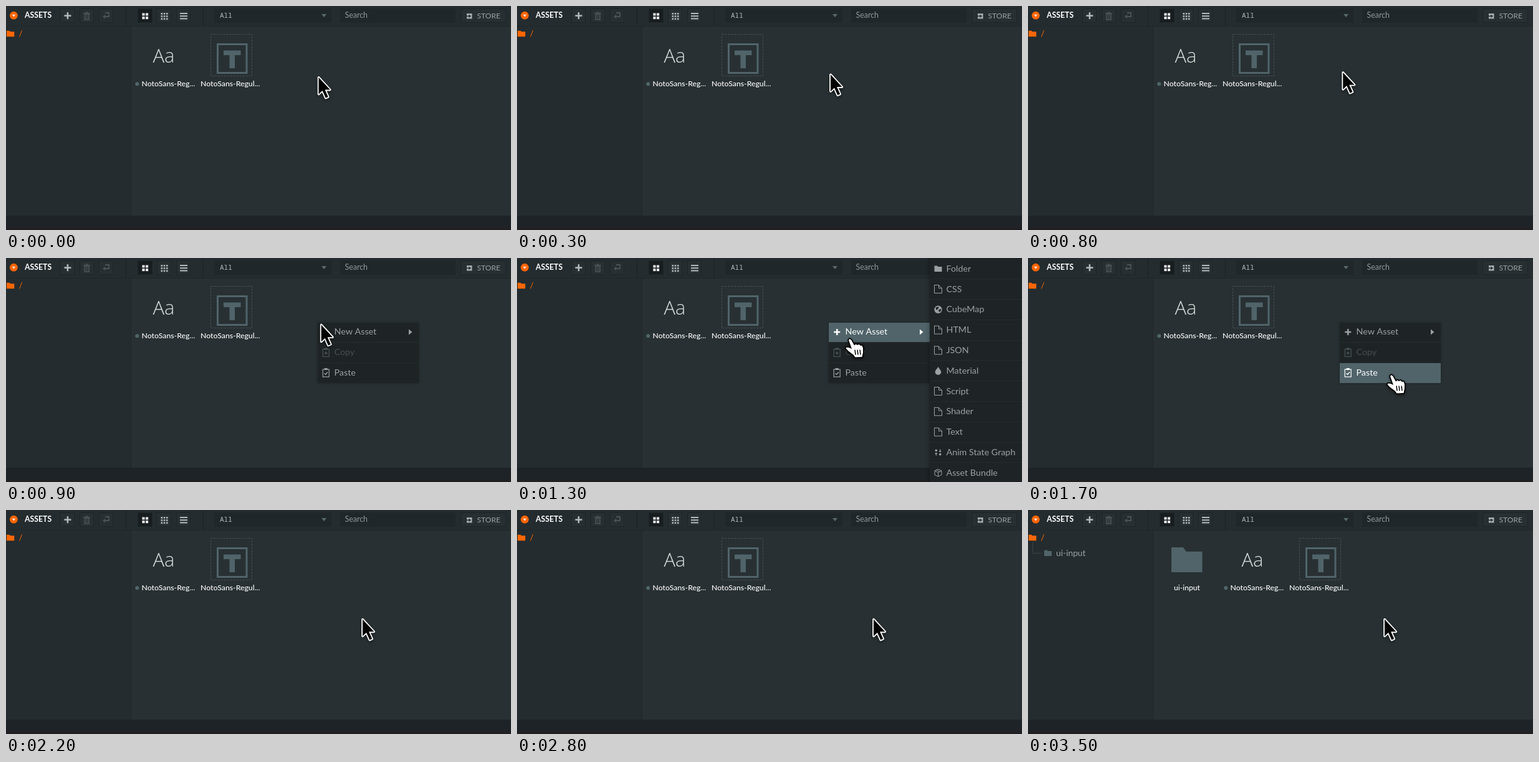
Recreate the animation shown at these times as an HTML page with a canvas. Size 810x360 px, loop 4000 ms.

```html
<!DOCTYPE html>
<html lang="en">
<head>
<meta charset="utf-8">
<title>Assets panel</title>
<style>
html, body { margin: 0; width: 100%; height: 100%; overflow: hidden; background: #283033; }
canvas { display: block; width: 810px; height: 360px; }
</style>
</head>
<body>
<canvas id="stage" width="810" height="360"></canvas>
<script>
const ctx = document.getElementById('stage').getContext('2d');
const LOOP = 4000, STEP = 100;
const MENU_OPEN = 900, HOVER_NEW = 1000, LEAVE_NEW = 1400, HOVER_PASTE = 1600;
const MENU_CLOSE = 2100, FOLDER_ADDED = 3100;
const ORANGE = '#ff6600', GREY = '#9ba1a3', SLATE = '#50646a', DIM = '#4a5356';
const SANS = 'Lato, sans-serif';

// Cursor path: time, x, y
const path = [
  [0, 500.5, 112.8], [600, 503.5, 103.8], [1000, 505, 106],
  [1300, 533.5, 130], [1700, 582.5, 188], [2000, 582.5, 188],
  [2100, 575.5, 180], [2200, 571, 173.8], [LOOP, 571, 173.8]
];

function cursorAt(t) {
  const i = path.findIndex(p => p[0] > t);
  const [t0, x0, y0] = path[i - 1], [t1, x1, y1] = path[i];
  const k = (t - t0) / (t1 - t0);
  return [x0 + (x1 - x0) * k, y0 + (y1 - y0) * k];
}

function rect(x, y, w, h, color) {
  ctx.fillStyle = color;
  ctx.fillRect(x, y, w, h);
}

function frame(x, y, w, h, color, width = 1) {
  ctx.strokeStyle = color;
  ctx.lineWidth = width;
  ctx.strokeRect(x, y, w, h);
}

function text(str, x, y, size, color, weight = 400, family = SANS) {
  ctx.font = `${weight} ${size}px ${family}`;
  ctx.fillStyle = color;
  ctx.fillText(str, x, y);
}

function trace(points) {
  ctx.beginPath();
  points.forEach(([x, y]) => ctx.lineTo(x, y));
}

function poly(points, color) {
  trace(points);
  ctx.closePath();
  ctx.fillStyle = color;
  ctx.fill();
}

function line(points, color, width = 1) {
  trace(points);
  ctx.strokeStyle = color;
  ctx.lineWidth = width;
  ctx.stroke();
}

function dot(x, y, r, color) {
  ctx.beginPath();
  ctx.arc(x, y, r, 0, Math.PI * 2);
  ctx.fillStyle = color;
  ctx.fill();
}

function at(x, y, draw) {
  ctx.save();
  ctx.translate(x, y);
  draw();
  ctx.restore();
}

function folder(x, y, w, h, color) {
  at(x, y, () => poly([
    [0, 0], [w * .38, 0], [w * .48, h * .17], [w, h * .17], [w, h], [0, h]
  ], color));
}

function plus(x, y, r, color) {
  rect(x - r, y - 1.25, r * 2, 2.5, color);
  rect(x - 1.25, y - r, 2.5, r * 2, color);
}

function button(x, w = 23, fill = '#272f32') {
  rect(x, 4, w, 23, fill);
  frame(x + .5, 4.5, w - 1, 22, '#1e2527');
}

function dotGrid(x, y, count, size, gap, color) {
  for (let i = 0; i < count * count; i++)
    rect(x + i % count * gap, y + Math.floor(i / count) * gap, size, size, color);
}

function drawHeader() {
  rect(0, 0, 810, 32, '#242c2f');
  rect(0, 32, 810, 1, '#1f2628');
  rect(192, 0, 1, 32, '#1b2224');
  rect(316, 0, 1, 32, '#1b2224');
  dot(12.4, 15.2, 6.4, ORANGE);
  poly([[9.4, 13.8], [15.4, 13.8], [12.4, 17.4]], '#f5dfd1');
  text('ASSETS', 30, 19.4, 12.3, '#ffffff', 700);

  [87, 118, 149].forEach(x => button(x));
  plus(98.9, 15.6, 5.5, '#b4bbbd');
  rect(124, 11, 11, 1.5, DIM);
  rect(127.5, 9.3, 4, 1.5, DIM);
  frame(126, 13, 7.2, 9, DIM, 1.5);
  line([[128.5, 14], [128.5, 21]], DIM);
  line([[131, 14], [131, 21]], DIM);
  line([[159, 11], [165, 11], [165, 17], [158, 17]], DIM, 1.8);
  poly([[155, 17], [159.2, 13.8], [159.2, 20.2]], DIM);

  button(211, 24, '#181e20');
  button(242);
  button(273);
  dotGrid(218.5, 11.5, 2, 4, 5.6, '#ffffff');
  dotGrid(248.5, 11, 3, 2.7, 4.2, '#aeb5b7');
  for (let i = 0; i < 3; i++) rect(279, 11 + i * 4.2, 12, 2, '#b4bbbd');

  rect(334, 4, 188, 23, '#20272a');
  text('All', 343, 19, 11, '#b1b8ba', 400, '"Noto Sans Mono", monospace');
  poly([[506, 13], [514, 13], [510, 18]], '#596a6e');
  rect(536, 4, 185, 23, '#20272a');
  text('Search', 543.5, 19.3, 12.4, '#8f989a');
  button(729, 73);
  rect(739, 12, 8.5, 8.5, '#a6adaf');
  line([[737.5, 16.3], [744, 16.3]], '#242c2f', 1.5);
  poly([[742.5, 13.6], [746, 16.3], [742.5, 19]], '#242c2f');
  text('STORE', 755.5, 20.2, 12.1, GREY);
}

function drawPanel() {
  rect(0, 0, 810, 360, '#283033');
  rect(0, 33, 200, 304, '#242c2f');
  rect(200, 33, 1, 304, '#20272a');
  drawHeader();
  rect(0, 337, 810, 20, '#1d2326');
  rect(0, 356, 810, 4, '#211f21');
  folder(1, 39.7, 12.3, 9.6, ORANGE);
  text('/', 20.5, 49, 13.5, ORANGE);
}

function drawFonts() {
  text('Aa', 235.5, 90.5, 31, '#d9dddd', 300, '"Open Sans", "Noto Sans", sans-serif');
  dot(210.3, 125.2, 3, '#50666a');
  text('NotoSans-Reg...', 217.5, 129, 12.25, '#ffffff', 500);

  ctx.setLineDash([3, 2]);
  frame(328.5, 45.5, 66, 67, '#455255');
  ctx.setLineDash([]);
  frame(339.5, 61.5, 46.5, 46, SLATE, 3);
  rect(349, 71.5, 27.5, 7.5, SLATE);
  rect(358.5, 79, 8.5, 21, SLATE);
  text('NotoSans-Regul...', 312, 129, 12.25, '#ffffff', 500);
}

function drawNewFolder() {
  line([[7.5, 51], [7.5, 69.5], [22, 69.5]], '#394447');
  folder(26, 64.5, 12, 9.5, SLATE);
  text('ui-input', 45, 74, 13.8, GREY);
  folder(230, 60, 49.5, 40, SLATE);
  text('ui-input', 234, 129, 12.1, '#ffffff', 500);
}

function clipboard(x, y, color, check) {
  at(x, y, () => {
    frame(-5, -5.5, 10, 12, color, 1.2);
    rect(-2.5, -7.5, 5, 3, color);
    if (check) line([[-2.6, .8], [-.7, 2.7], [2.8, -1.2]], color, 1.4);
    else {
      line([[-2.6, .8], [2.6, .8]], color, 1.4);
      line([[0, -1.8], [0, 3.4]], color, 1.4);
    }
  });
}

function drawMenu(active) {
  ctx.save();
  ctx.shadowColor = 'rgba(0,0,0,.3)';
  ctx.shadowBlur = 4;
  rect(500, 104, 162, 97, '#1e2426');
  ctx.restore();
  rect(500, 135, 162, 1, '#252c2e');
  rect(500, 168, 162, 1, '#252c2e');
  if (active === 'new') rect(500, 104, 162, 31, SLATE);
  if (active === 'paste') rect(500, 169, 162, 32, SLATE);
  const newColor = active === 'new' ? '#ffffff' : GREY;
  const pasteColor = active === 'paste' ? '#ffffff' : GREY;
  plus(513.3, 119, 5, newColor);
  text('New Asset', 526.5, 123.3, 14.3, newColor);
  poly([[646, 114.5], [651.5, 119], [646, 123.5]], newColor);
  clipboard(513.2, 152, DIM, false);
  text('Copy', 526.5, 156.3, 14.3, '#454d50');
  clipboard(513.2, 184.5, pasteColor, true);
  text('Paste', 526.5, 189.2, 14.3, pasteColor);
}

const icons = {
  folder: () => folder(-6, -4.7, 12, 9.5, GREY),
  file() {
    line([[-6, -6.5], [1, -6.5], [6, -1.5], [6, 6.5], [-6, 6.5], [-6, -7]], GREY);
    line([[1, -6.5], [1, -1.5], [6, -1.5]], GREY);
  },
  globe() {
    dot(0, 0, 6.2, GREY);
    poly([[-4, -3], [1, -5], [0, -1], [-3, 1]], '#1e2426');
    poly([[1, 0], [5, -1], [4, 3], [1, 4]], '#1e2426');
  },
  drop() {
    ctx.beginPath();
    ctx.moveTo(0, -6.5);
    ctx.bezierCurveTo(2, -2.5, 4.8, -1, 4.8, 2);
    ctx.bezierCurveTo(4.8, 8, -4.8, 8, -4.8, 2);
    ctx.bezierCurveTo(-4.8, -1, -2, -2.5, 0, -6.5);
    ctx.fillStyle = GREY;
    ctx.fill();
  },
  states() {
    for (const s of [-1, 1]) {
      dot(3.2 * s, 3.2 * s, 1.8, GREY);
      line([[3.2 * s, -5 * s], [3.2 * s, -1 * s]], GREY, 1.2);
      poly([[1 * s, -2.5 * s], [5.4 * s, -2.5 * s], [3.2 * s, .2 * s]], GREY);
    }
  },
  box() {
    line([[0, -6], [5.5, -3.2], [5.5, 3.2], [0, 6], [-5.5, 3.2], [-5.5, -3.2], [0, -6]], GREY);
    line([[-5.5, -3.2], [0, -.4], [5.5, -3.2]], GREY);
    line([[0, -.4], [0, 6]], GREY);
    line([[-2.7, -4.6], [2.8, -1.8]], GREY);
  }
};

const assetTypes = [
  ['folder', 'Folder'], ['file', 'CSS'], ['globe', 'CubeMap'], ['file', 'HTML'],
  ['file', 'JSON'], ['drop', 'Material'], ['file', 'Script'], ['file', 'Shader'],
  ['file', 'Text'], ['states', 'Anim State Graph'], ['box', 'Asset Bundle']
];

function drawSubmenu() {
  ctx.save();
  ctx.shadowColor = 'rgba(0,0,0,.4)';
  ctx.shadowBlur = 7;
  rect(662, -10, 160, 380, '#1e2426');
  ctx.restore();
  assetTypes.forEach(([icon, label], i) => {
    const y = 17.2 + i * 32.8;
    rect(662, Math.round(y + 16), 148, 1, '#252c2e');
    at(675.5, y, icons[icon]);
    text(label, 688.5, y + 4.6, 14.3, GREY);
  });
}

function outline(points, fill, stroke) {
  ctx.save();
  ctx.shadowColor = 'rgba(0,0,0,.45)';
  ctx.shadowBlur = 4;
  ctx.shadowOffsetY = 2;
  ctx.lineJoin = 'round';
  trace(points);
  ctx.closePath();
  ctx.strokeStyle = stroke;
  ctx.lineWidth = 3.6;
  ctx.stroke();
  ctx.restore();
  poly(points, fill);
}

function arrow() {
  outline([
    [1, 2], [1, 29], [7, 23.2], [12.3, 35], [16.2, 33.2], [11, 21.8], [19.3, 21.8]
  ], '#000000', '#ffffff');
}

function hand() {
  outline([
    [-1.5, 2], [0, 0], [2.5, 1.5], [7.5, 10.5], [10, 8.5], [12.5, 10], [15, 8.8],
    [17.5, 11], [20, 10.8], [21.5, 15], [21.5, 22], [20, 29], [9, 29.5],
    [6, 25.5], [-2, 19.5], [-6, 15.3], [-5, 13.5], [-1, 14], [3.5, 16]
  ], '#ffffff', '#000000');
  for (let i = 0; i < 3; i++)
    line([[8.5 + i * 4, 17.5], [9.5 + i * 4, 25.5]], '#000000', 1.5);
}

function render(t) {
  drawPanel();
  if (t >= FOLDER_ADDED) drawNewFolder();
  at(t >= FOLDER_ADDED ? 107 : 0, 0, drawFonts);

  const menuOpen = t >= MENU_OPEN && t < MENU_CLOSE;
  const onNew = t >= HOVER_NEW && t < LEAVE_NEW;
  if (menuOpen) drawMenu(onNew ? 'new' : t >= HOVER_PASTE ? 'paste' : '');
  if (onNew) drawSubmenu();
  at(...cursorAt(t), menuOpen && t >= HOVER_NEW ? hand : arrow);
}

const start = performance.now();
function tick() {
  const t = (performance.now() - start) % LOOP;
  render(Math.floor(t / STEP) * STEP);
  requestAnimationFrame(tick);
}
tick();
</script>
</body>
</html>
```
